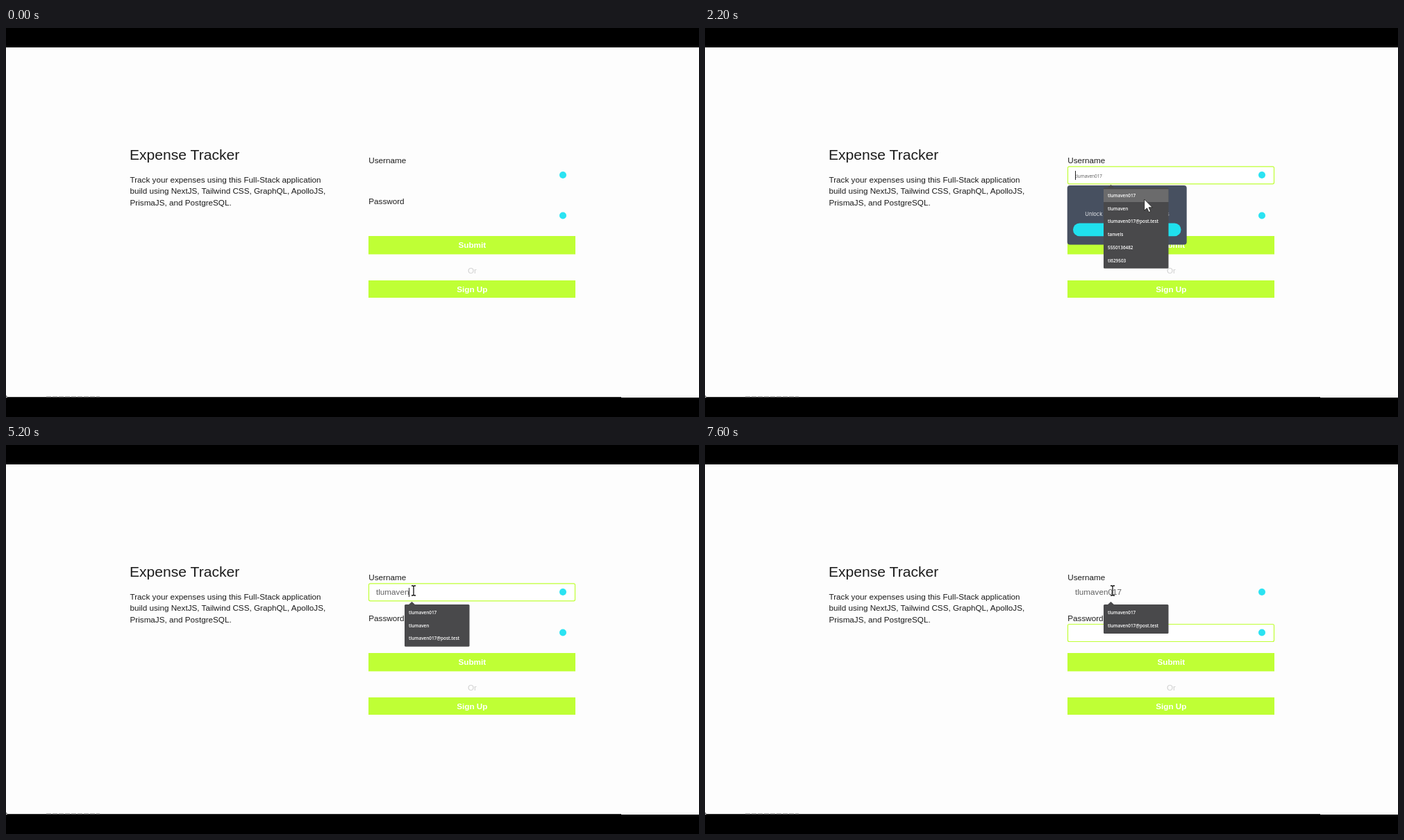
Write an HTML page that moves like this. It is 998 px wide and 561 px high and loops after 8000 ms.

```html
<!DOCTYPE html>
<html lang="en">
<head>
<meta charset="utf-8">
<title>Expense Tracker</title>
<style>
  html, body { margin: 0; width: 100%; height: 100%; overflow: hidden; background: #fdfdfd; }
  svg { display: block; width: 100vw; height: 100vh; }
  text { font: 11.7px "Liberation Sans", Arial, sans-serif; fill: #1c1c1c; white-space: pre; }
  .title { font-size: 21.1px; }
  .button { font-weight: bold; fill: #fff; text-anchor: middle; }
  .lime { fill: #bfff35; }
  .field { fill: #fff; stroke: #bfff35; stroke-width: 1.2; }
  .icon { fill: #2be3f2; }
  .typed { fill: #626262; }
  .small { font: 600 6.4px "Open Sans", sans-serif; fill: #fff; }
  .preview { font-weight: 400; fill: #555; }
  .tip { font: 7.6px Inter, sans-serif; fill: #e4e6ea; text-anchor: middle; }
</style>
</head>
<body>
<svg viewBox="0 0 998 561">
  <rect width="998" height="28"/>
  <rect y="533" width="998" height="28"/>
  <path d="M0 530Q0 532.5 3 532.5H886" fill="none" stroke="#333"/>
  <path d="M58 532H135" stroke="#777" stroke-dasharray="7 2"/>

  <text class="title" x="178" y="190">Expense Tracker</text>
  <text x="178.5" y="223">Track your expenses using this Full-Stack application</text>
  <text x="178.5" y="239.3">build using NextJS, Tailwind CSS, GraphQL, ApolloJS,</text>
  <text x="178.5" y="255.7">PrismaJS, and PostgreSQL.</text>

  <text x="522.3" y="194.5">Username</text>
  <text x="522.3" y="253.5">Password</text>
  <rect id="field" class="field" x="522.5" width="297" height="25" rx="2"/>
  <circle class="icon" cx="802" cy="212" r="5"/>
  <circle class="icon" cx="802" cy="270.5" r="5"/>
  <rect class="lime" x="522" y="300" width="298" height="26.4"/>
  <text class="button" x="671.3" y="317">Submit</text>
  <text x="665" y="354" style="fill:#d0d0d0">Or</text>
  <rect class="lime" x="522" y="364" width="298" height="25"/>
  <text class="button" x="671.3" y="380.5">Sign Up</text>

  <text id="typed" class="typed" x="533" y="216"></text>
  <text id="preview" class="small preview" x="533" y="215.5">tlumaven017</text>
  <rect id="caret" width="1" height="13" fill="#222"/>

  <g id="tip">
    <rect x="521.7" y="227" width="172" height="85.5" rx="4" fill="#475060"/>
    <text class="tip" x="608" y="270.5">Unlock Velmopad to autofill forms</text>
    <rect x="530" y="281.5" width="155.5" height="18.7" rx="9.3" fill="#1fe0ee"/>
  </g>

  <g id="menu">
    <path d="M579 231L584.5 226L590 231Z" fill="#49494b"/>
    <rect id="panel" x="574" y="230" width="93.5" rx="1.5" fill="#49494b"/>
    <rect id="hover" x="574" y="232.3" width="93.5" height="18.7" fill="#6b6b6c"/>
    <g id="rows"></g>
  </g>

  <path id="arrow" d="M0 0V16.3L3.8 12.8L6.5 18.6L9 17.5L6.4 11.8H11.6Z" fill="#fff" stroke="#222" stroke-width=".9"/>
  <path id="beam" d="M-3 -7H-1L0 -6L1 -7H3M0 -6V6M-3 7H-1L0 6L1 7H3" fill="none" stroke="#111" stroke-width="1.3"/>
</svg>
<script>
const LOOP = 8000;
const USER = "tlumaven";
const ROW = 18.7;
const suggestions = [USER + "017", USER, USER + "017@post.test", "tanvels", "5550136482", "tl629503"];
const $ = id => document.getElementById(id);

// Each entry changes part of the state and holds until the next one.
const steps = [
  [0, { text: "", focus: 0, caret: 0, menu: 0, tip: 0, hover: 0, pointer: "", at: [0, 0] }],
  [200, { pointer: "arrow", at: [1, 514] }],
  [400, { at: [330, 330] }],
  [600, { at: [612, 178] }],
  [800, { pointer: "beam", at: [719.5, 208] }],
  [1000, { focus: 1, caret: 1, menu: 1 }],
  [1200, { at: [750, 209] }],
  [1400, { pointer: "arrow", at: [800, 212], caret: 0 }],
  [1600, { tip: 1 }],
  [1800, { at: [735, 234], caret: 1 }],
  [2000, { at: [648, 244], hover: 1 }],
  [2200, { at: [632.7, 247] }],
  [2400, { at: [556, 246], hover: 0 }],
  [2600, { pointer: "beam", at: [587, 210] }],
  [2800, { caret: 0 }],
  [3200, { caret: 1 }],
  [3600, { caret: 0 }],
  [4000, { caret: 1 }],
  [4200, { text: USER.slice(0, 1), tip: 0 }],
  [4400, { text: USER.slice(0, 2) }],
  [4600, { caret: 0 }],
  [5000, { text: USER.slice(0, 4), caret: 1 }],
  [5200, { text: USER }],
  [5400, { text: USER + "0" }],
  [5600, { text: USER + "01" }],
  [5800, { caret: 0 }],
  [6000, { caret: 1 }],
  [6200, { text: USER + "019" }],
  [6400, { caret: 0 }],
  [6600, { text: USER + "01", caret: 1 }],
  [7000, { text: USER + "017" }],
  [7200, { focus: 2 }],
  [7600, { caret: 0 }]
];

function show(id, visible) {
  $(id).style.display = visible ? "" : "none";
}

function render(time) {
  const s = Object.assign({}, ...steps.filter(([start]) => start <= time).map(step => step[1]));
  const top = s.focus === 2 ? 258.5 : 199.8;

  show("field", s.focus);
  $("field").setAttribute("y", top);
  $("typed").textContent = s.text;

  const width = s.text && s.focus === 1 ? $("typed").getComputedTextLength() : 0;
  show("caret", s.caret);
  $("caret").setAttribute("x", Math.round(532.5 + width));
  $("caret").setAttribute("y", Math.round(top + 6));

  const matches = suggestions.filter(item => item.startsWith(s.text));
  show("menu", s.menu && matches.length);
  $("panel").setAttribute("height", 4.6 + ROW * matches.length);
  $("rows").innerHTML = matches
    .map((item, i) => `<text class="small" x="580" y="${244 + i * ROW}">${item}</text>`)
    .join("");
  show("hover", s.hover);
  show("preview", s.hover);
  show("tip", s.tip);

  for (const id of ["arrow", "beam"]) {
    show(id, s.pointer === id);
    $(id).setAttribute("transform", `translate(${s.at})`);
  }
}

let last = -1;
function tick() {
  const time = Math.floor(performance.now() % LOOP / 200) * 200;
  if (time !== last) render(last = time);
  requestAnimationFrame(tick);
}
tick();
</script>
</body>
</html>
```
